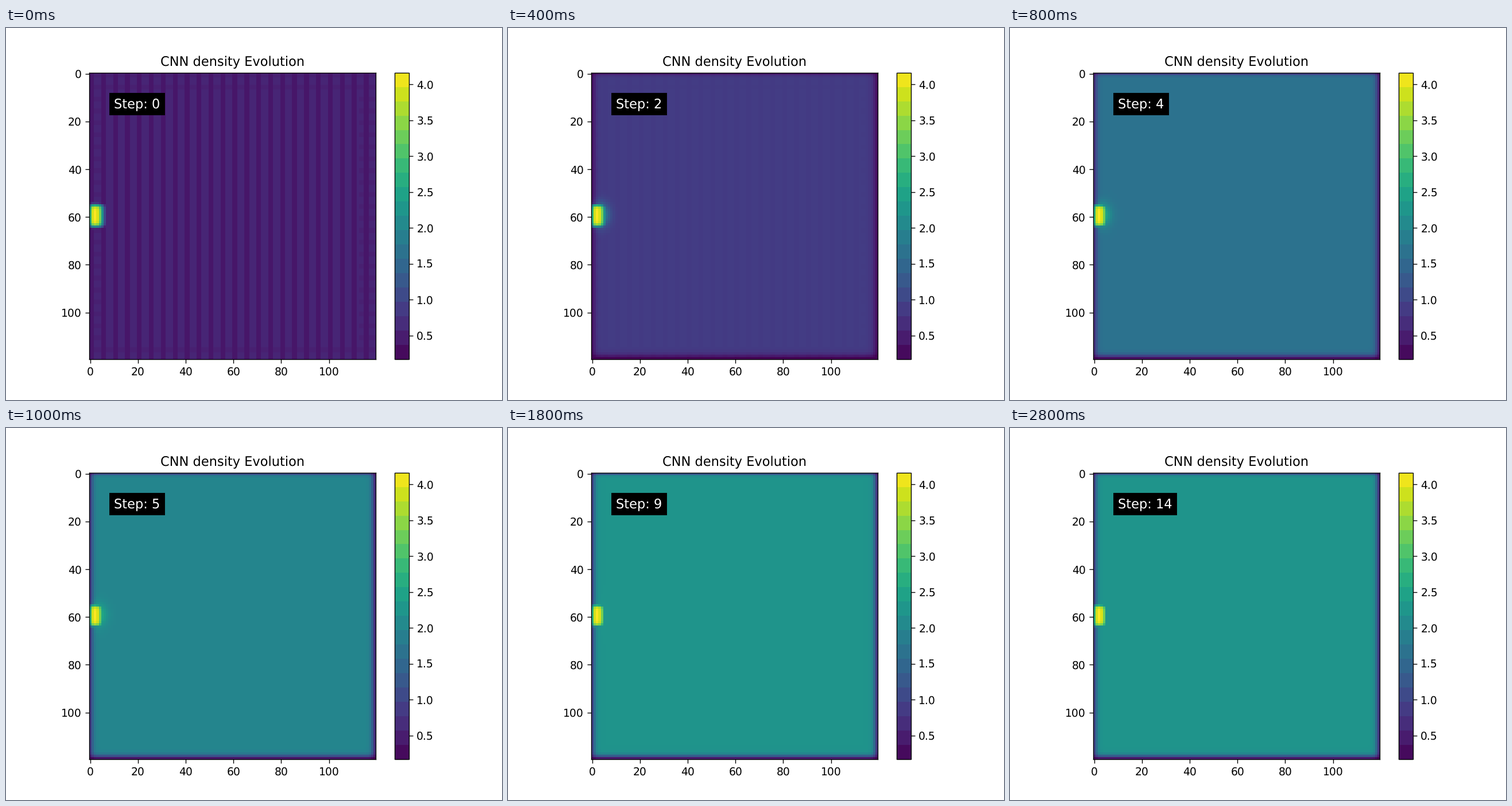
Write a matplotlib script that moves like this. It is 864 px wide and 648 px high and loops after 3000 ms.

```python
import numpy as np
import matplotlib.pyplot as plt
from matplotlib.animation import FuncAnimation
from matplotlib.cm import ScalarMappable
from matplotlib.colors import ListedColormap, Normalize

N = 120
STEPS = 15
INTERVAL = 200
VMIN, VMAX = 0.173, 4.163
BANDS = 20

plt.rcParams.update({
    "axes.linewidth": 0.72,
    "xtick.major.width": 0.72,
    "ytick.major.width": 0.72,
    "text.hinting": "no_hinting",
})

Y, X = np.mgrid[:N, :N]


def sigmoid(x):
    return 1 / (1 + np.exp(-x))


def wall(distance, depth, width):
    """Share of the density that is left at a distance from a wall."""
    return 1 - depth * np.exp(-(distance / width) ** 1.5)


def walls(step, fill):
    depth = min(step / 2, 1)
    width = 1.6 - 0.35 * fill
    return (wall(X, 0.56 * depth, width)
            * wall(N - 1 - X, 0.62 * depth, width)
            * wall(Y, 0.42 * depth, width / 2)
            * wall(N - 1 - Y, 0.78 * depth, width))


def ripples():
    """Stripes five cells apart, with a faint weave along the walls."""
    stripes = (X % 5 < 2).astype(float)
    rim = np.minimum(np.minimum(X, N - 1 - X), np.minimum(Y, N - 1 - Y)) < 7
    weave = rim & (X % 5 > 1) & (Y % 5 < 2)
    return stripes + 0.4 * weave


def inlet():
    cols = sigmoid((X + 0.3) / 0.6) * sigmoid((5 - X) / 0.9)
    rows = sigmoid((Y - 54.7) / 0.5) * sigmoid((64 - Y) / 0.55)
    spot = cols * rows
    return VMAX * spot / spot.max()


RIPPLES = ripples()
INLET = inlet()
GLOW = np.exp(-((X - 3) / 3.7) ** 2 - ((Y - 59) / 4.6) ** 2)


def density(step):
    fill = sigmoid(1.05 * (step - 3.3))
    pulse = step / 2.4 * np.exp(1 - step / 2.4)
    field = 0.53 + 1.705 * fill - 0.16 * np.exp(-step) * RIPPLES
    field = (field + 1.5 * pulse ** 2 * GLOW) * walls(step, fill)
    return np.maximum(field, INLET)


viridis = plt.get_cmap("viridis")
banded = ListedColormap(viridis((np.arange(BANDS) + 0.5) / BANDS))
norm = Normalize(VMIN, VMAX)

fig, ax = plt.subplots(figsize=(6.4, 4.8), dpi=135)
image = ax.imshow(density(0), cmap=viridis, norm=norm, interpolation="nearest")
fig.colorbar(ScalarMappable(norm, banded), ax=ax)
ax.set_title("CNN density Evolution")
label = ax.text(10, 10, "Step: 0", color="white", fontsize=12, va="top",
                bbox=dict(facecolor="black"))


def update(step):
    image.set_data(density(step))
    label.set_text(f"Step: {step}")
    return image, label


anim = FuncAnimation(fig, update, frames=STEPS, interval=INTERVAL,
                     repeat=True, repeat_delay=0)
plt.show()
```
